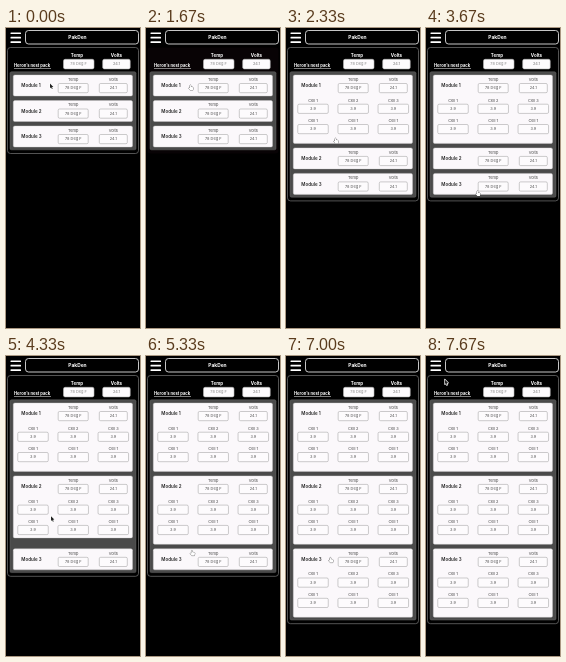
Write an HTML page with a canvas that moves like this. It is 134 by 300 pixels and loops after 8 s.

```html
<!DOCTYPE html>
<html lang="en">
<head>
<meta charset="utf-8">
<title>Battery modules</title>
<style>
  html, body { margin: 0; width: 100%; height: 100%; overflow: hidden; background: #000; }
  canvas { display: block; width: 100vw; height: 100vh; }
</style>
</head>
<body>
<canvas id="stage"></canvas>
<script>
const W = 134, H = 300, LOOP = 8000;
const CLOSED = 21, OPEN = 68.4, PARTIAL = 62, GAP = 4.5;
const COLUMNS = [27, 67.2, 107.3];
const canvas = document.getElementById('stage');
const ctx = canvas.getContext('2d');

// Pointer steps: time, shape, x, y
const pointer = [
  [0, 'arrow', 44, 55.5],
  [1000, 'hand', 42, 56],
  [1330, 'hand', 42.4, 56.6],
  [2000, 'hand', 47.5, 109.8],
  [2670, 'hand', 46, 131],
  [3330, 'hand', 46, 132.5],
  [3670, 'hand', 49.5, 162.5],
  [4000, 'arrow', 45, 160.2],
  [5000, 'arrow', 45, 160.6],
  [5330, 'hand', 44, 194],
  [5670, 'hand', 42.4, 200.2],
  [6000, 'hand', 42.4, 201],
  [7330, 'arrow', 36, 60.5],
  [7670, 'arrow', 18.8, 23.5]
];

// The panel outline disappears while a card is opening
const pressed = [[1670, 2330], [4000, 4330], [6670, 7000]];

function fit() {
  const ratio = window.devicePixelRatio || 1;
  canvas.width = Math.round(innerWidth * ratio);
  canvas.height = Math.round(innerHeight * ratio);
}

function box(x, y, w, h, r, fill, stroke, line = 0.6) {
  ctx.beginPath();
  ctx.roundRect(x, y, w, h, r);
  if (fill) { ctx.fillStyle = fill; ctx.fill(); }
  if (stroke) { ctx.strokeStyle = stroke; ctx.lineWidth = line; ctx.stroke(); }
}

function text(str, x, y, size, color, weight = 400, align = 'center') {
  ctx.font = `${weight} ${size}px Inter, "Open Sans", sans-serif`;
  ctx.textAlign = align;
  ctx.textBaseline = 'middle';
  ctx.fillStyle = color;
  ctx.fillText(str, x, y);
}

function field(label, value, cx, y, w) {
  text(label, cx, y, 3.9, '#444');
  box(cx - w / 2, y + 3.7, w, 9.2, 1.3, '#fdfbfd', '#999', 0.5);
  text(value, cx, y + 8.5, 3.9, '#555');
}

function header() {
  for (const y of [4.4, 8.8, 13.2]) box(4.5, y, 10.5, 1.7, 0.5, '#fff');
  box(19.5, 2.5, 113, 13.5, 3, '#000', '#ddd', 0.9);
  text('PakDen', 71.5, 9.9, 4.9, '#fff', 700);
}

function summary() {
  text('Heron’s nest pack', 8, 38, 4.15, '#fff', 700, 'left');
  box(8, 40, 37, 0.6, 0, '#fff');
  text('Temp', 71, 28, 4.5, '#fff', 700);
  text('Volts', 110.5, 28, 4.5, '#fff', 700);
  box(57.5, 31.3, 30.5, 9.6, 1.6, '#fdfbfd', '#bbb');
  box(96.7, 31.3, 27.5, 9.6, 1.6, '#fdfbfd', '#bbb');
  text('78 Deg F', 72.5, 36.2, 3.9, '#888');
  text('24.1', 110.5, 36.2, 3.9, '#777');
}

function card(n, y, h) {
  box(7.3, y, 119.2, h, 1.5, '#fbf8fb', '#ccc', 0.4);
  ctx.save();
  ctx.beginPath();
  ctx.rect(7, y, 120, h);
  ctx.clip();
  text('Module ' + n, 15.3, y + 10.9, 4.5, '#222', 600, 'left');
  field('Temp', '78 Deg F', COLUMNS[1], y + 4.8, 30);
  field('Volts', '24.1', COLUMNS[2], y + 4.8, 28);
  if (h > CLOSED) {
    COLUMNS.forEach((cx, i) => {
      field('Cell ' + (i + 1), '3.9', cx, y + 25.5, 30.5);
      field('Cell 1', '3.9', cx, y + 45.8, 30.5);
    });
  }
  ctx.restore();
}

function modules(t) {
  // The layout makes room slightly before the second card fills it
  const slots = [
    t < 2000 ? CLOSED : OPEN,
    t < 4000 ? CLOSED : t < 4330 ? PARTIAL : OPEN,
    t < 7000 ? CLOSED : OPEN
  ];
  const bottom = 47 + slots.reduce((a, b) => a + b) + 2 * GAP;
  const isPressed = pressed.some(([from, to]) => t >= from && t < to);
  box(1.5, 19.5, 131, bottom - 13, 3, isPressed ? '#080305' : null, isPressed ? null : '#777', 0.7);
  box(4, 43.8, 126, bottom - 41, 1.5, '#4a4a4a', '#666', 0.5);
  summary();
  let y = 47;
  slots.forEach((slot, i) => {
    const filling = i === 1 && t >= 4000 && t < 4670;
    card(i + 1, y, filling ? PARTIAL : slot);
    y += slot + GAP;
  });
}

const shapes = {
  arrow: new Path2D('M0 0V5.6L1.3 4.5L2.2 6.6L3.2 6.1L2.3 4.1L4 4Z'),
  hand: new Path2D('M1.7 4V.9Q2.3 0 2.9 .9V2.6L5 3Q5.8 3.2 5.7 4L5.2 6.6H2.1L.3 4.2Q.4 3.2 1.7 4Z')
};

function drawPointer(t) {
  const [, shape, x, y] = pointer.filter(p => p[0] <= t).pop();
  const isArrow = shape === 'arrow';
  ctx.save();
  ctx.translate(x, y);
  ctx.scale(0.85, 0.85);
  ctx.lineWidth = isArrow ? 1.4 : 0.7;
  ctx.lineJoin = 'round';
  ctx.strokeStyle = isArrow ? '#fff' : '#333';
  ctx.fillStyle = isArrow ? '#222' : '#fff';
  ctx.stroke(shapes[shape]);
  ctx.fill(shapes[shape]);
  ctx.restore();
}

function render() {
  const t = performance.now() % LOOP;
  ctx.setTransform(canvas.width / W, 0, 0, canvas.height / H, 0, 0);
  ctx.fillStyle = '#000';
  ctx.fillRect(0, 0, W, H);
  header();
  modules(t);
  drawPointer(t);
  requestAnimationFrame(render);
}

addEventListener('resize', fit);
fit();
render();
</script>
</body>
</html>
```
